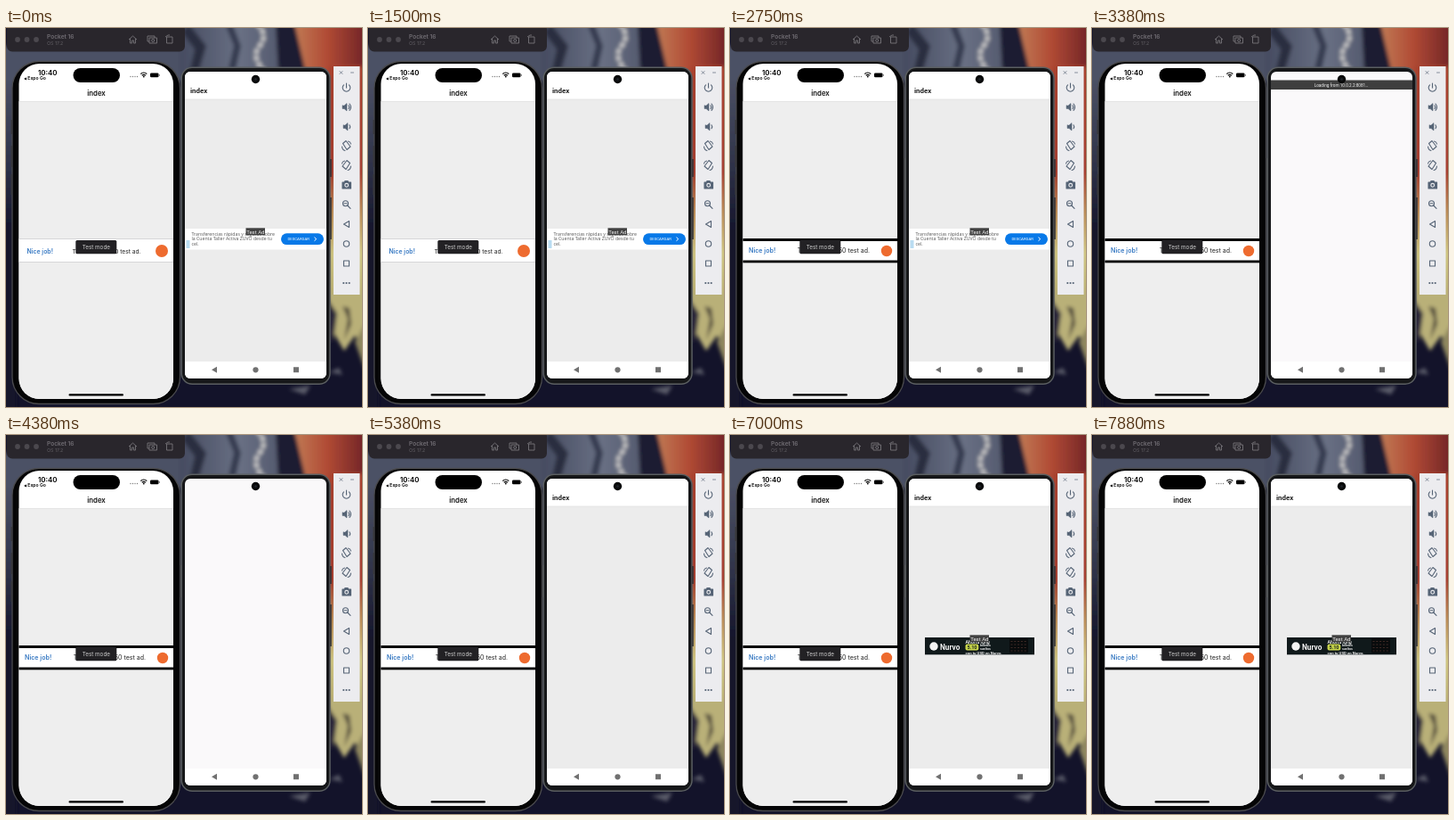
An HTML page for the animation above (8000 ms loop, 400 px wide and 425 px high).

```html
<!DOCTYPE html>
<html lang="en">
<head>
<meta charset="utf-8">
<title>Two simulators reloading</title>
<style>
  html, body { margin: 0; width: 100%; height: 100%; overflow: hidden; background: #11132a; }
  svg { display: block; width: 100vw; height: 100vh; }
  text { white-space: pre; }
  .ios { font-family: Inter, sans-serif; }
  .droid { font-family: Roboto, sans-serif; }
  .bold { font-weight: 700; }
  .semi { font-weight: 600; }
  .mid { text-anchor: middle; }
  .line { fill: none; stroke: #566476; stroke-width: 1.1; stroke-linejoin: round; stroke-linecap: round; }
</style>
</head>
<body>
<svg viewBox="0 0 400 425">
  <defs>
    <filter id="soft" x="-30%" y="-30%" width="160%" height="160%"><feGaussianBlur stdDeviation="2.2"/></filter>
    <linearGradient id="warm" x2="0" y2="1">
      <stop offset="0" stop-color="#a8422f"/><stop offset=".45" stop-color="#a63f30"/>
      <stop offset=".62" stop-color="#b98a56"/><stop offset=".8" stop-color="#cfc582"/><stop offset="1" stop-color="#b9ae72"/>
    </linearGradient>
    <linearGradient id="skin">
      <stop offset="0" stop-color="#c07a55"/><stop offset=".45" stop-color="#b04a34"/><stop offset="1" stop-color="#6b2026"/>
    </linearGradient>
    <linearGradient id="denim">
      <stop offset="0" stop-color="#454b60"/><stop offset=".5" stop-color="#697084"/><stop offset="1" stop-color="#4a4f64"/>
    </linearGradient>
    <linearGradient id="edge" x2="0" y2="1">
      <stop offset="0" stop-color="#565b6e"/><stop offset=".3" stop-color="#32364c"/><stop offset=".5" stop-color="#15162c"/>
    </linearGradient>
    <clipPath id="iosScreen"><rect x="14.5" y="40" width="173.5" height="376" rx="23"/></clipPath>
    <clipPath id="droidScreen"><rect x="201" y="49" width="159" height="344" rx="6"/></clipPath>
  </defs>

  <!-- Blurred wallpaper -->
  <rect width="400" height="425" fill="#13132a"/>
  <g filter="url(#soft)">
    <rect x="-8" y="20" width="20" height="415" fill="url(#edge)"/>
    <path d="M-5 20H205V60H-5Z" fill="#4c5165"/>
    <path d="M195 -5H318L330 55H195Z" fill="url(#denim)"/>
    <path d="M205 -5L225 20L216 50H206L212 24L198 5Z" fill="#292d40"/>
    <path d="M246 -5L256 20L250 46H258L264 20L254 -5Z" fill="#343a50"/>
    <path d="M303 -5H326L338 50H306Z" fill="#1c1b30"/>
    <path d="M282 -5Q295 8 285 20T290 48" fill="none" stroke="#c9c8c8" stroke-width="5" stroke-dasharray="6 2"/>
    <path d="M324 -5H408V55H338Z" fill="url(#skin)"/>
    <path d="M362 43H408V305H362Z" fill="url(#warm)"/>
    <path d="M362 296H408V372L392 345L380 362L366 338Z" fill="#b9b078"/>
    <path d="M362 305L372 320L368 350L362 352Z" fill="#2a283a"/>
    <path d="M378 312L384 326L380 350L388 332L386 314Z" fill="#57503f"/>
    <path d="M392 352L404 330V385Z" fill="#8f875e"/>
    <path d="M318 405L342 401L336 411ZM364 386L374 381L378 389Z" fill="#5c5d6b"/>
  </g>

  <!-- Simulator title bar -->
  <rect x="1" y="-4" width="200" height="30.500" rx="6" fill="#29262c"/>
  <g fill="#4b484e"><circle cx="13" cy="13" r="2.900"/><circle cx="23.500" cy="13" r="2.900"/><circle cx="34" cy="13" r="2.900"/></g>
  <g class="ios" fill="#706d73">
    <text x="46" y="12" font-size="6.600" class="semi">Pocket 16</text>
    <text x="46" y="19" font-size="5.300" fill="#625f65">OS 17.2</text>
  </g>
  <g fill="none" stroke="#77747a" stroke-width=".9">
    <path d="M138 13L142.500 9L147 13M139.500 12V17H141.500V14H143.500V17H145.500V12"/>
    <path d="M161 15H159V9H167V11M161 11H169.500V17H161Z"/><circle cx="165.200" cy="14" r="1.500"/>
    <path d="M180.500 10H187V17H180.500ZM179 10L182 8L184 8"/>
  </g>

  <!-- Left phone -->
  <rect x="7" y="37.500" width="188.500" height="384" rx="30" fill="#050506" stroke="#4a4a4d" stroke-width="1.300"/>
  <path d="M6.300 103V119M6.300 132V156M6.300 164V187M196.300 146V182" stroke="#39393c" stroke-width="1.500"/>
  <g clip-path="url(#iosScreen)" class="ios">
    <rect x="14" y="40" width="175" height="377" fill="#fff"/>
    <g id="iosIndex">
      <rect x="14" y="82.500" width="175" height="335" fill="#eee"/>
      <path d="M14 82.500H189" stroke="#d8d8d8" stroke-width=".6"/>
      <text x="101.500" y="76" font-size="7.800" class="semi mid" fill="#151515">index</text>
    </g>
    <g id="iosAdWide">
      <rect x="14" y="236.500" width="175" height="26" fill="#fff" stroke="#c9c9cc" stroke-width=".7"/>
      <text x="23.500" y="252.500" font-size="6.900" fill="#3678c2" class="semi">Nice job!</text>
      <text x="151.500" y="252.500" font-size="6.650" fill="#222" text-anchor="end">This is a 320x50 test ad.</text>
      <circle cx="175" cy="250" r="7" fill="#ee6b2f"/>
    </g>
    <g id="iosAdFramed">
      <rect x="14" y="236" width="175" height="27.300" fill="#000"/>
      <rect x="14" y="239" width="175" height="21.500" fill="#fff"/>
      <text x="21" y="252.300" font-size="7.100" fill="#3678c2" class="semi">Nice job!</text>
      <text x="157" y="252.300" font-size="7" fill="#222" text-anchor="end">This is a 320x50 test ad.</text>
      <circle cx="176" cy="250" r="6.200" fill="#ee6b2f"/>
    </g>
    <g id="iosBadge">
      <rect x="78.300" y="238" width="46" height="15.300" rx="1.500" fill="#222124"/>
      <text x="101.300" y="248" font-size="6.300" fill="#cfcfcf" class="mid">Test mode</text>
    </g>
    <g id="iosDownload">
      <rect x="14" y="40" width="175" height="37" fill="#404040"/>
      <text x="101" y="73.800" font-size="5.400" fill="#f4f4f4" class="mid">Downloading 100%…</text>
    </g>
    <text x="36" y="53" font-size="7.900" class="semi">10:40</text>
    <text x="20" y="58.300" font-size="5.100" class="semi"><tspan font-family="DejaVu Sans, sans-serif" font-size="4">◀</tspan> Expo Go</text>
    <g fill="#777"><circle cx="140" cy="54.500" r=".65"/><circle cx="142.500" cy="54.500" r=".65"/><circle cx="145" cy="54.500" r=".65"/><circle cx="147.500" cy="54.500" r=".65"/></g>
    <path d="M151.300 51.500Q154.800 48.500 158.300 51.500M152.700 53.300Q154.800 51.500 156.900 53.300" fill="none" stroke="#000" stroke-width="1.200"/><circle cx="154.800" cy="54.500" r=".9"/>
    <rect x="162" y="50.500" width="9.500" height="4.800" rx="1.300"/><rect x="172" y="52" width=".9" height="1.800" fill="#777"/>
    <rect x="75.500" y="45" width="52.500" height="16" rx="8"/>
    <rect x="70.500" y="410.300" width="61.500" height="2.200" rx="1.100"/>
  </g>

  <!-- Right phone -->
  <rect x="197.200" y="44.300" width="166.800" height="355" rx="12" fill="#161719" stroke="#5b5f61" stroke-width="1.500"/>
  <path d="M365 147V167M365 190V237" stroke="#2c2d30" stroke-width="1.500"/>
  <g clip-path="url(#droidScreen)" class="droid">
    <rect x="201" y="49" width="159" height="344" fill="#faf9fa"/>
    <g id="droidIndex">
      <rect x="201" y="49" width="159" height="31" fill="#fff"/>
      <rect x="201" y="80" width="159" height="294" fill="#ececec"/>
      <path d="M201 80H360" stroke="#dcdcdc" stroke-width=".6"/>
      <text x="207" y="73" font-size="7.900" class="bold" fill="#202020">index</text>
    </g>
    <g id="droidAdBank">
      <rect x="201" y="225" width="159" height="23.500" fill="#fff"/>
      <g font-size="5.200" fill="#555" font-family="Open Sans, sans-serif">
        <text x="208.500" y="233">Transferencias rápidas y seguras sobre</text>
        <text x="208.500" y="238.400">la Cuenta Taller Activa ZUVO desde tu</text>
        <text x="208.500" y="243.800">cel.</text>
      </g>
      <rect x="202.500" y="238" width="4" height="9" fill="#b9dcf1"/>
      <rect x="309" y="230.300" width="48" height="12.800" rx="6.400" fill="#0879e8"/>
      <text x="316.500" y="238.300" font-size="4.300" fill="#fff">DESCARGAR</text>
      <path d="M346.500 234.700L348.700 236.700L346.500 238.700" fill="none" stroke="#fff"/>
    </g>
    <g id="droidAdCoin">
      <rect x="219" y="227" width="123" height="19.300" fill="#10191b"/>
      <circle cx="229" cy="237" r="4.700" fill="#f4f4f4"/>
      <text x="236" y="240.700" font-size="8.300" fill="#f4f4f4" class="bold">Nurvo</text>
      <g font-size="5.200" fill="#eee" class="semi">
        <text x="264.500" y="233.500">Ahorra long</text>
        <text x="264.500" y="245.500" font-size="4.300">con tu USD en Nurvo.</text>
        <text x="281" y="237.300" font-size="3.600">billetes</text>
        <text x="281" y="241" font-size="3.600">sueltos</text>
      </g>
      <rect x="264.500" y="234.500" width="14.800" height="7" rx="2" fill="#c7d44b"/>
      <text x="272" y="240" font-size="5.500" class="bold mid" fill="#17201a">5.10</text>
      <rect x="314" y="228.500" width="21" height="16" rx="1" fill="#080b0c"/>
      <path d="M315.500 231.500H333M315.500 235H333M315.500 238.500H333M315.500 242H333" stroke="#3f2a26" stroke-width="1.200" stroke-dasharray="2 1.800"/>
    </g>
    <g id="droidBadge">
      <rect x="269.500" y="224.300" width="21.500" height="8" fill="#414141"/>
      <text x="280.300" y="230.500" font-size="6" fill="#f5f5f5" class="mid">Test Ad</text>
    </g>
    <g id="droidLoading">
      <rect x="201" y="58.500" width="159" height="10.500" fill="#3e3e3e"/>
      <text x="280" y="65.600" font-size="4.700" fill="#f0f0f0" class="mid">Loading from 10.0.2.2:8081…</text>
    </g>
    <rect x="201" y="374" width="159" height="19" fill="#fff"/>
    <path d="M237 379.800V386.800L231 383.300ZM323 380.300H329V386.300H323Z" fill="#707070"/>
    <circle cx="280.500" cy="383.300" r="3.100" fill="#707070"/>
    <circle cx="280.500" cy="57.500" r="4.700" fill="#08090a"/>
    <circle cx="280.500" cy="57.500" r="1.500" fill="#1d2126"/>
  </g>

  <!-- Emulator tools -->
  <rect x="368" y="43" width="29.500" height="256" fill="#ececef"/>
  <g class="line">
    <path d="M375 48.500L378 51.500M378 48.500L375 51.500M387.500 50H390.500" stroke-width=".7"/>
    <path d="M379.500 63.800A4.300 4.300 0 1 0 385.500 63.800M382.500 62V67"/>
    <path d="M378 87V90.500H380L383 93V84.500L380 87ZM379 109V112.500H381L384 115V106.500L381 109Z" fill="#566476" stroke-width=".5"/>
    <path d="M385 86.800Q386.500 88.700 385 90.700M386 85Q389 88.700 386 92.500M386 108.800Q387.500 110.700 386 112.700"/>
    <path d="M378.500 129.500L382 126.500L387 133L383 136.500ZM377.500 133Q378 137 381 137.500M384.500 127Q387 127.500 387.500 130"/>
    <path d="M386.500 151.500L383 148.500L378 155L382 158.500ZM387.500 155Q387 159 384 159.500M380.500 149Q378 149.500 377.500 152"/>
    <path d="M378 173H380L381 171.500H384L385 173H387.500V180H378Z" fill="#566476"/>
    <circle cx="382.700" cy="176.300" r="1.900" fill="#566476" stroke="#ececef"/>
    <circle cx="381.500" cy="196.800" r="3"/><path d="M383.700 199L387 202.300M380 196.800H383"/>
    <path d="M385.500 216.500V223.500L379.500 220Z"/>
    <circle cx="382.500" cy="242" r="3.200"/>
    <path d="M379.500 261H385.500V267H379.500Z"/>
  </g>
  <g fill="#566476"><circle cx="379.300" cy="286" r="1.100"/><circle cx="382.500" cy="286" r="1.100"/><circle cx="385.700" cy="286" r="1.100"/></g>
</svg>
<script>
  const LOOP = 8000;
  // Hard cuts: each layer is visible inside its [start, end) spans, in ms.
  const spans = {
    iosIndex: [[0, 1880], [2500, LOOP]],
    iosAdWide: [[0, 1880]],
    iosAdFramed: [[2750, LOOP]],
    iosBadge: [[0, 1880], [2750, LOOP]],
    iosDownload: [[1880, 2500]],
    droidIndex: [[0, 3130], [5000, LOOP]],
    droidAdBank: [[0, 3130]],
    droidAdCoin: [[5500, LOOP]],
    droidBadge: [[0, 3130], [5500, LOOP]],
    droidLoading: [[3130, 4000]]
  };
  const layers = Object.entries(spans).map(([id, times]) => ({ el: document.getElementById(id), times }));

  function draw() {
    const t = performance.now() % LOOP;
    for (const { el, times } of layers) {
      const shown = times.some(([start, end]) => t >= start && t < end);
      el.style.display = shown ? "" : "none";
    }
    requestAnimationFrame(draw);
  }
  draw();
</script>
</body>
</html>
```
